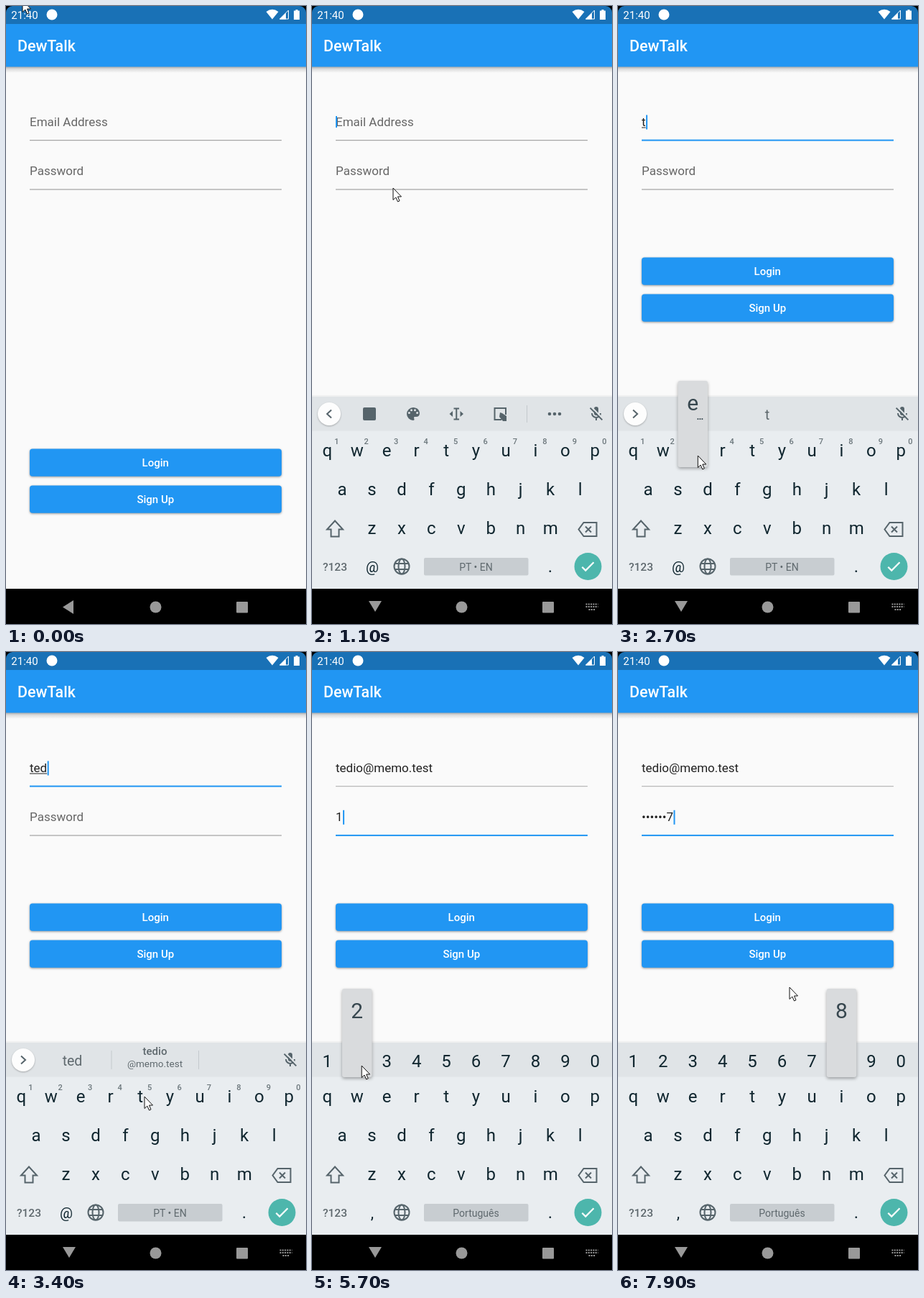
These frames come from a looping animation (418 by 859 pixels, 8 s). An HTML page:

```html
<!DOCTYPE html>
<html lang="en">
<head>
<meta charset="utf-8">
<title>Login form</title>
<style>
html, body { margin: 0; width: 100%; height: 100%; overflow: hidden; background: #fafafa; }
svg { display: block; width: 418px; height: 859px; font-family: Roboto, sans-serif; }
.label { font-size: 17px; fill: #666; }
.value { font-size: 17px; fill: #212121; white-space: pre; }
.button rect { fill: #2196f3; filter: drop-shadow(0 1.5px 1.5px #0006); }
.button text { font-size: 15px; font-weight: 500; fill: #fff; }
.mid, .button text { text-anchor: middle; }
.key { font-size: 24px; fill: #10262f; }
.alt { font-size: 11px; font-weight: 500; fill: #6b767b; }
.hint { fill: #5f696e; }
.icon { fill: #56646b; }
.line { fill: none; stroke: #56646b; stroke-width: 2; }
.split { stroke: #c3c9cd; }
.popup rect { fill: #d9dbdd; filter: drop-shadow(0 2px 2px #0005); }
.popup text { font-size: 30px; fill: #37474f; }
.nav { fill: #999; }
</style>
</head>
<body>
<svg viewBox="0 0 418 859">
  <defs>
    <linearGradient id="shade" x2="0" y2="1">
      <stop stop-color="#000" stop-opacity=".34"/>
      <stop offset=".4" stop-color="#000" stop-opacity=".12"/>
      <stop offset="1" stop-color="#000" stop-opacity="0"/>
    </linearGradient>
  </defs>
  <rect width="418" height="859" fill="#fafafa"/>
  <rect y="84" width="418" height="9" fill="url(#shade)"/>
  <rect width="418" height="84.500" fill="#2196f3"/>
  <rect width="418" height="25" fill="#1971b6"/>
  <path d="M0 0H9A9 9 0 0 0 0 9zM418 0h-9a9 9 0 0 1 9 9z"/>
  <text x="16" y="63" font-size="21.400" font-weight="500" fill="#fff">DewTalk</text>
  <g fill="#fff">
    <text x="7.300" y="17.500" font-size="15">21:40</text>
    <circle cx="64" cy="12" r="7.500"/>
    <path d="M371 18.500L362.500 8Q371 1.500 379.500 8z"/>
    <path d="M381.500 18L393.500 6V18z" fill="none" stroke="#fff"/>
    <path d="M381 18.500L390 9.500V18.500z"/>
    <path d="M403.500 5h3v1.500h2.500V19h-8V6.500h2.500z"/>
  </g>

  <g id="fields"></g>
  <rect id="compose" x="33" y="168.500" height="1" fill="#212121"/>
  <rect id="caret" width="2" fill="#2196f3"/>
  <g id="buttons" class="button"></g>

  <g id="board">
    <rect y="541" width="418" height="3" fill="#000" opacity=".04"/>
    <rect y="543" width="418" height="270" fill="#e9edf0"/>
    <rect y="543" width="418" height="47.500" fill="#e0e4e7"/>
    <g id="keys"></g>
    <g id="alts"></g>
    <g class="line">
      <path d="M32 715.500L21 727.500h5.500v10h11v-10h5.500z"/>
      <path d="M378.500 718H396.500V737H378.500L371.500 727.500zM381 723.500l8 8m0-8l-8 8"/>
      <circle cx="125" cy="779" r="10.500"/>
      <ellipse cx="125" cy="779" rx="4.500" ry="10.500"/>
      <path d="M115.500 775h19m-19 8h19"/>
    </g>
    <text class="mid hint" x="32" y="784.500" font-size="15.500" font-weight="500">?123</text>
    <rect x="156" y="767" width="145.500" height="24.500" rx="2" fill="#c8cdd1"/>
    <text class="mid hint" id="space" x="228.500" y="784.500" font-size="14"></text>
    <text class="mid key" id="mark" x="84" y="787"></text>
    <text class="mid key" x="332" y="787">.</text>
    <circle cx="384.500" cy="779" r="19" fill="#4db6ac"/>
    <path d="M376.300 779.700l4.900 4.900 11.300-11.300" fill="none" stroke="#fff" stroke-width="2.200"/>

    <g id="bar">
      <circle cx="24" cy="567" r="16" fill="#fdfdfd" style="filter:drop-shadow(0 1px 1px #0004)"/>
      <path id="chevron" class="line" d="M27 561.500l-6 5.500 6 5.500"/>
      <g class="line" transform="translate(384 555)">
        <rect x="9" y="2" width="6" height="12" rx="3" class="icon" stroke="none"/>
        <path d="M6 11a6 6 0 0 0 12 0M12 17v4"/>
        <path d="M5 2L21 18" stroke="#e0e4e7"/>
        <path d="M3.600 3.600L20.400 20.400"/>
      </g>
    </g>
    <g id="tools" class="icon">
      <rect x="71" y="558" width="18" height="18" rx="2"/>
      <path d="M141 558a9 9 0 0 0 0 18q2 0 1.500-2-1.500-3 1-3h1.500q5 0 5-5c0-4.400-4-8-9-8z"/>
      <g id="paint" fill="#e0e4e7"></g>
      <path d="M191.500 567l4.500-4v8zM211 567l-4.500-4v8z"/>
      <path class="line" d="M197.500 559.500h7.500m-3.750 0v15m-3.750 0h7.500M264 575h-9.500v-16h15.500v9"/>
      <path d="M262 565l3 1 6 4v7h-5l-5-6z"/>
      <path class="split" d="M299.500 555v24"/>
      <g id="more"></g>
    </g>
    <g id="tips" class="mid hint">
      <text id="single" x="208" y="575" font-size="20">t</text>
      <g id="triple">
        <text id="typed" x="92.500" y="575" font-size="19.500"></text>
        <text x="207.500" y="560" font-size="15" font-weight="500">tedio</text>
        <text x="207.500" y="577" font-size="13.500">@memo.test</text>
        <path class="split" d="M147 554v26M268.500 554v26"/>
      </g>
    </g>
    <g id="digits"></g>
  </g>
  <g id="popup" class="popup">
    <rect id="popBox" width="41.500" rx="3"/>
    <text class="mid" id="popText" x="20.750" y="41"></text>
    <text id="popMore" x="26" y="54" style="font-size:13px;font-weight:700">…</text>
  </g>

  <rect y="810" width="418" height="49"/>
  <g class="nav">
    <path id="back" d="M79 835.500L94 826V845z"/>
    <g id="hide">
      <path d="M79 827H97L88 842z"/>
      <path stroke="#999" stroke-width="2" stroke-dasharray="2 1.300" d="M381.500 831.500h17m-17 3.500h17m-13 4h9"/>
    </g>
    <circle cx="208.500" cy="835.500" r="8"/>
    <rect x="321" y="828" width="16" height="15.500" rx="1"/>
  </g>
  <path id="mouse" d="M0 0V16.500L3.800 13 6.500 19 9 17.800 6.500 12H11.500z" fill="#fff" stroke="#111" stroke-linejoin="round"/>
</svg>
<script>
const $ = id => document.getElementById(id);
const show = (id, on) => { $(id).style.display = on ? '' : 'none'; };
const set = (id, attrs) => { for (const k in attrs) $(id).setAttribute(k, attrs[k]); };
const put = (id, text) => { $(id).textContent = text; };
const fill = (id, items, make) => { $(id).innerHTML = [...items].map(make).join(''); };

const LOOP = 8000, TICK = 100, HOLD = 150, BLINK = 400;
const PITCH = 41.45, LEFT = 21.3, ROW = 54, GAP = 68.3;
const MAIL = 'tedio@memo.test';
const time = { open: 850, up: 1100, laid: 1200, accept: 3900, pass: 4400, digits: 4600 };

// rows are indented by whole and half keys
const rows = ['qwertyuiop', 'asdfghjkl', 'zxcvbnm'];
const indent = [0, .5, 1.5];
const keyX = i => LEFT + i * PITCH;
const glyph = (cls, x, y, c) => `<text class="mid ${cls}" x="${x}" y="${y}">${c}</text>`;

$('keys').innerHTML = rows.map((s, r) =>
  [...s].map((c, i) => glyph('key', keyX(i + indent[r]), 626 + r * ROW, c)).join('')).join('');
fill('digits', '1234567890', (c, i) => glyph('key', keyX(i), 577, c));
fill('alts', '1234567890', (c, i) => glyph('alt', keyX(i) + 13, 609, c));
fill('more', '...', (c, i) => `<circle cx="${331 + 7 * i}" cy="567" r="2.3"/>`);
fill('paint', '....', (c, i) => {
  const a = Math.PI * (.08 + .28 * i);
  return `<circle cx="${141 - 5.8 * Math.cos(a)}" cy="${567 - 5.8 * Math.sin(a)}" r="1.5"/>`;
});
fill('buttons', ['Login', 'Sign Up'], (s, i) => `<g transform="translate(33 ${615.5 + 51 * i})">
  <rect width="351" height="38.3" rx="4"/><text x="175.3" y="24.5">${s}</text></g>`);
fill('fields', ['Email Address', 'Password'], (s, i) => `<g transform="translate(33 ${167 + GAP * i})">
  <text class="label" id="label${i}">${s}</text><text class="value" id="value${i}"></text>
  <rect id="rule${i}" width="351"/></g>`);

// top of the popup and centre of the key
function spot(c) {
  if (c > '0' && c <= '9') return { x: keyX(c - 1), y: 568, top: 468, height: 123 };
  const r = rows.findIndex(s => s.includes(c)), y = 618 + r * ROW;
  return { x: keyX(rows[r].indexOf(c) + indent[r]), y, top: y - 97, height: 120 };
}

const type = (s, start, beat) => [...s].map((c, i) => ({ c, at: start + i * beat, ...spot(c) }));
const letters = type(MAIL.slice(0, 3), 2300, 400);
const numbers = type('12345678', 5200, 370);
const taps = [...letters, ...numbers];
const landed = (list, t) => list.filter(p => t >= p.at + HOLD).length;

// the pointer rests at each stop and glides between them
const stop = (at, x, y, stay = 0) => ({ at, x, y, end: at + stay });
const onKey = p => stop(p.at + 30, p.x, p.y + 7, 50);
const stops = [
  stop(0, 23, -8, 100), stop(500, 65, 161, 300), stop(1100, 113, 253),
  ...letters.map(onKey),
  stop(3400, 193, 618), stop(3600, 206, 568, 300), stop(4200, 128, 236, 200), stop(4800, 60, 584, 100),
  ...numbers.map(onKey),
  stop(7900, 239, 466, 100)
];

function pointer(t) {
  const i = stops.findLastIndex(s => t >= s.at), a = stops[i], b = stops[i + 1] || a;
  const k = t <= a.end ? 0 : (t - a.end) / (b.at - a.end);
  return [a.x + (b.x - a.x) * k, a.y + (b.y - a.y) * k];
}

const wakes = [time.up - TICK, time.accept, time.pass, ...taps.map(p => p.at + HOLD)];
function caretOn(t) {
  const last = Math.max(...wakes.filter(w => w <= t));
  return last > 0 && (t - last) % (2 * BLINK) < BLINK;
}

function field(i, text, focus) {
  put('value' + i, text);
  show('label' + i, !text);
  set('rule' + i, focus ? { y: 18.6, height: 2, fill: '#2196f3' }
    : { y: 19.2, height: 1, fill: text ? '#aaa' : '#929292' });
}

function draw(t) {
  const open = t >= time.open, laid = t >= time.laid, done = t >= time.accept;
  const second = t >= time.pass, digits = t >= time.digits;
  const typed = MAIL.slice(0, landed(letters, t));
  const count = landed(numbers, t);
  const tips = t >= letters[0].at && !done;

  field(0, done ? MAIL : typed, laid && !second);
  field(1, count ? '•'.repeat(count - 1) + count : '', second);
  const active = $('value' + +second), width = active.getComputedTextLength();
  set('compose', { width: done ? 0 : width });
  set('caret', {
    x: width ? 33.5 + width : 33,
    y: (width ? 151.5 : 153) + (second ? GAP : 0),
    height: width ? 20 : 16
  });
  show('caret', caretOn(t));

  set('buttons', { transform: `translate(0 ${laid ? -266 : 0})` });
  const rise = Math.max(0, time.up - t) / (time.up - time.open);
  set('board', { transform: `translate(0 ${267 * rise * rise})` });
  show('board', open);
  show('back', !open);
  show('hide', open);
  show('alts', !digits);
  show('digits', digits);
  show('bar', !digits);
  show('tools', !digits && !tips);
  show('tips', tips);
  show('single', typed.length < 2);
  show('triple', typed.length > 1);
  put('typed', typed);
  set('chevron', { transform: tips ? 'rotate(180 24 567)' : '' });
  put('space', digits ? 'Português' : 'PT • EN');
  put('mark', digits ? ',' : '@');
  $('mark').style.fontSize = digits ? '22px' : '20px';

  const tap = taps.find(p => t >= p.at && t < p.at + HOLD);
  show('popup', tap);
  if (tap) {
    set('popup', { transform: `translate(${tap.x - PITCH / 2} ${tap.top})` });
    set('popBox', { height: tap.height });
    put('popText', tap.c);
    show('popMore', tap.c === 'e');
  }
  set('mouse', { transform: `translate(${pointer(t)})` });
}

let last = -1;
function frame(now) {
  const t = Math.floor(now % LOOP / TICK) * TICK;
  if (t !== last) draw(last = t);
  requestAnimationFrame(frame);
}
draw(0);
requestAnimationFrame(frame);
</script>
</body>
</html>
```
